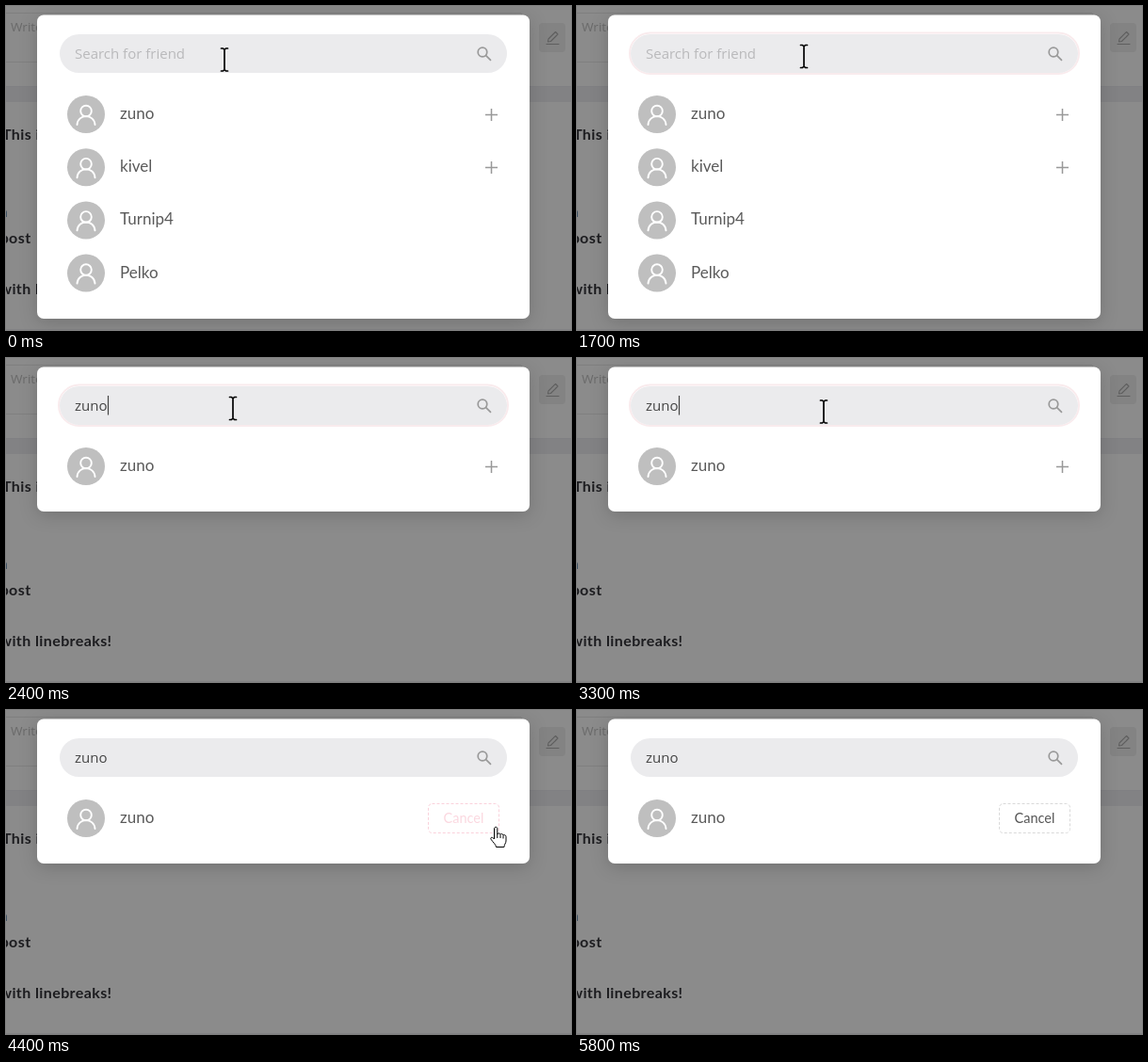
An HTML page that plays this animation: 600x344 px, repeating every 5900 ms.

```html
<!DOCTYPE html>
<html lang="en">
<head>
<meta charset="utf-8">
<title>Friend search</title>
<style>
  html, body { margin: 0; width: 100%; height: 100%; overflow: hidden; background: #8b8b8b; }
  svg { display: block; width: 600px; height: 344px; }
  text { font-family: Lato, sans-serif; white-space: pre; }
  .post { font-size: 16px; font-weight: 700; letter-spacing: .4px; fill: #1c1c1f; }
  .field { font: 15px "Open Sans", sans-serif; fill: #444; }
  .name { font-size: 17px; fill: #5a5a5a; }
  .line { fill: none; stroke-linecap: round; stroke-linejoin: round; }
  #dialog { filter: drop-shadow(0 4px 9px rgba(0, 0, 0, .17)); }
</style>
</head>
<body>
<svg viewBox="0 0 600 344">
  <defs>
    <g id="avatar">
      <circle r="20" fill="#bfbfbf"/>
      <g class="line" stroke="#fff" stroke-width="1.9">
        <circle cy="-3.500" r="5.800"/>
        <path d="M-9.500 11C-8.800-.8 8.800-.8 9.500 11"/>
      </g>
    </g>
    <path id="plus" d="M-6.500 0H6.500M0-6.500V6.500" stroke="#999" stroke-width="1.500"/>
  </defs>

  <rect width="600" height="344" fill="#8b8b8b"/>
  <rect y="86" width="600" height="16" fill="#828284"/>
  <path d="M0 85.500H600" stroke="#7f7f83"/>
  <path d="M0 343.500H600" stroke="#838385"/>
  <rect x="-20" y="7.500" width="568" height="52" rx="2" fill="none" stroke="#7f7f7f"/>
  <text x="5" y="27" class="field" style="font-size:13.500px;fill:#6a6a6a">Write</text>
  <rect x="566" y="18" width="28" height="31" rx="4" fill="#838383"/>
  <path class="line" d="M576 35L583.500 27.500 586 30 578.500 37.500 575.500 38ZM574 40.500H587" stroke="#5e5e5e" stroke-width="1.100"/>
  <text x="-4" y="142" class="post">This is</text>
  <text x="2" y="224" class="post" text-anchor="end" style="fill:#16344f">admin</text>
  <text x="26.500" y="251.500" class="post" text-anchor="end">post</text>
  <text x="112.500" y="306" class="post" text-anchor="end">with linebreaks!</text>

  <rect id="dialog" x="33" y="9.500" width="523" rx="7" fill="#fff"/>
  <rect id="ring" x="56" y="28.500" width="477" height="43.500" rx="21.750" fill="none" stroke="#f9ebed" stroke-width="2"/>
  <rect x="57" y="30" width="475" height="41" rx="20.500" fill="#ebebed"/>
  <text id="query" class="field" x="73" y="56"></text>
  <path id="caret" d="M.5 40V60.500" stroke="#444" stroke-width="1.200"/>
  <g class="line" stroke="#999" stroke-width="1.700">
    <circle cx="506" cy="49" r="4.800"/>
    <path d="M509.700 52.700L514.500 57.300"/>
  </g>
  <g id="rows"></g>
  <g id="cancel">
    <rect id="box" x="448.500" y="99.500" width="75" height="31" rx="4" fill="#fff" stroke-dasharray="3 2"/>
    <text id="label" x="486" y="120" text-anchor="middle" style="font-size:14.500px">Cancel</text>
  </g>

  <g id="beam" class="line" stroke="#000" stroke-width="1.700">
    <path d="M-3.500-12H-1.500L0-10.500 1.500-12H3.500M0-10.500V10.500M-3.500 12H-1.500L0 10.500 1.500 12H3.500"/>
  </g>
  <path id="arrow" d="M0 0V24L5.600 18.700 10 29 14 27.300 9.700 17.200H17Z" fill="#fff" stroke="#000" stroke-width="1.100"/>
  <g id="hand" stroke="#000" stroke-linejoin="round">
    <path d="M-1.500 1.800C-1.500-.2 1.800-.2 1.800 1.800V8C2 6.400 5 6.600 5 8.300 5.500 7 8 7.400 8 9.200 8.600 8.200 11 8.600 11 10.400V15C11 17.500 9 18.500 9 21.500H.5C.5 19-3 16.500-5 13.200-6 11.300-3.600 10.200-1.500 13Z" fill="#fff"/>
    <path d="M1.800 8V12M5 8.500V12M8 9.500V12.500"/>
  </g>
</svg>
<script>
const LOOP = 5900, TICK = 100;
const FILTER = 2400, ADDED = 4200, LEAVE = 5500;
const $ = id => document.getElementById(id);

const names = ["zuno", "kivel", "Turnip4", "Pelko"];
const word = names[0];

// [time, cursor, x, y]
const pointer = [
  [0, "beam", 232, 57], [100, "beam", 233, 56], [200, "beam", 235, 55],
  [300, "beam", 236, 54], [500, "beam", 241, 53.5],
  [3300, "beam", 262, 57], [3400, "arrow", 345, 76], [3500, "arrow", 436, 97],
  [3600, "arrow", 489, 108], [3700, "arrow", 503, 111],
  [3900, "hand", 515, 118], [4000, "hand", 520, 124],
  [5500, "hand", 516, 128], [5600, "arrow", 470, 205],
  [5700, "arrow", 405, 278], [5800, "", 0, 0]
];
const typed = [[0, 0], [1800, 1], [1900, 2], [2100, 3], [2200, 4]];
const blink = [[0, 0], [200, 1], [700, 0], [1200, 1], [1700, 0], [1800, 1], [2700, 0], [3300, 1], [3800, 0]];

const at = (steps, t) => steps.filter(s => s[0] <= t).pop();
const ramp = (t, start, span) => Math.min(1, Math.max(0, (t - start) / span));
const show = (el, on) => el.style.display = on ? "" : "none";
const mix = (a, b, k) => `rgb(${a.map((v, i) => Math.round(v + (b[i] - v) * k))})`;

$("rows").innerHTML = names.map((name, i) => {
  const y = 115 + i * 56.2;
  const plus = i < 2 ? `<use href="#plus" x="515.5" y="${Math.round(y) + .5}"/>` : "";
  return `<g><use href="#avatar" x="85" y="${y}"/><text class="name" x="121" y="${y + 5}">${name}</text>${plus}</g>`;
}).join("");
const rows = [...$("rows").children];
const firstPlus = rows[0].lastElementChild;

function render(t) {
  const count = at(typed, t)[1];
  const query = $("query");
  query.textContent = count ? word.slice(0, count) : "Search for friend";
  query.style.fill = count ? "#444" : "#b9b9bb";
  const end = 73 + (count ? query.getComputedTextLength() : 0);
  $("caret").setAttribute("transform", `translate(${Math.round(end)})`);
  show($("caret"), at(blink, t)[1]);
  $("ring").style.opacity = ramp(t, 100, 300) - ramp(t, ADDED - TICK, 300);

  const full = t < FILTER;
  $("dialog").setAttribute("height", full ? 322.5 : 153.5);
  rows.forEach((row, i) => show(row, full || i === 0));

  const added = t >= ADDED;
  show(firstPlus, !added);
  show($("cancel"), added);
  const hover = ramp(t, ADDED - TICK, 300) - ramp(t, LEAVE - TICK, 300);
  $("label").style.fill = mix([85, 85, 85], [251, 216, 224], hover);
  $("box").style.stroke = mix([217, 217, 217], [250, 209, 219], hover);

  const [, kind, x, y] = at(pointer, t);
  for (const id of ["beam", "arrow", "hand"]) {
    show($(id), id === kind);
    $(id).setAttribute("transform", `translate(${x} ${y})`);
  }
}

let start;
function loop(now) {
  start ??= now;
  render(Math.floor((now - start) % LOOP / TICK) * TICK);
  requestAnimationFrame(loop);
}
render(0);
requestAnimationFrame(loop);
</script>
</body>
</html>
```
